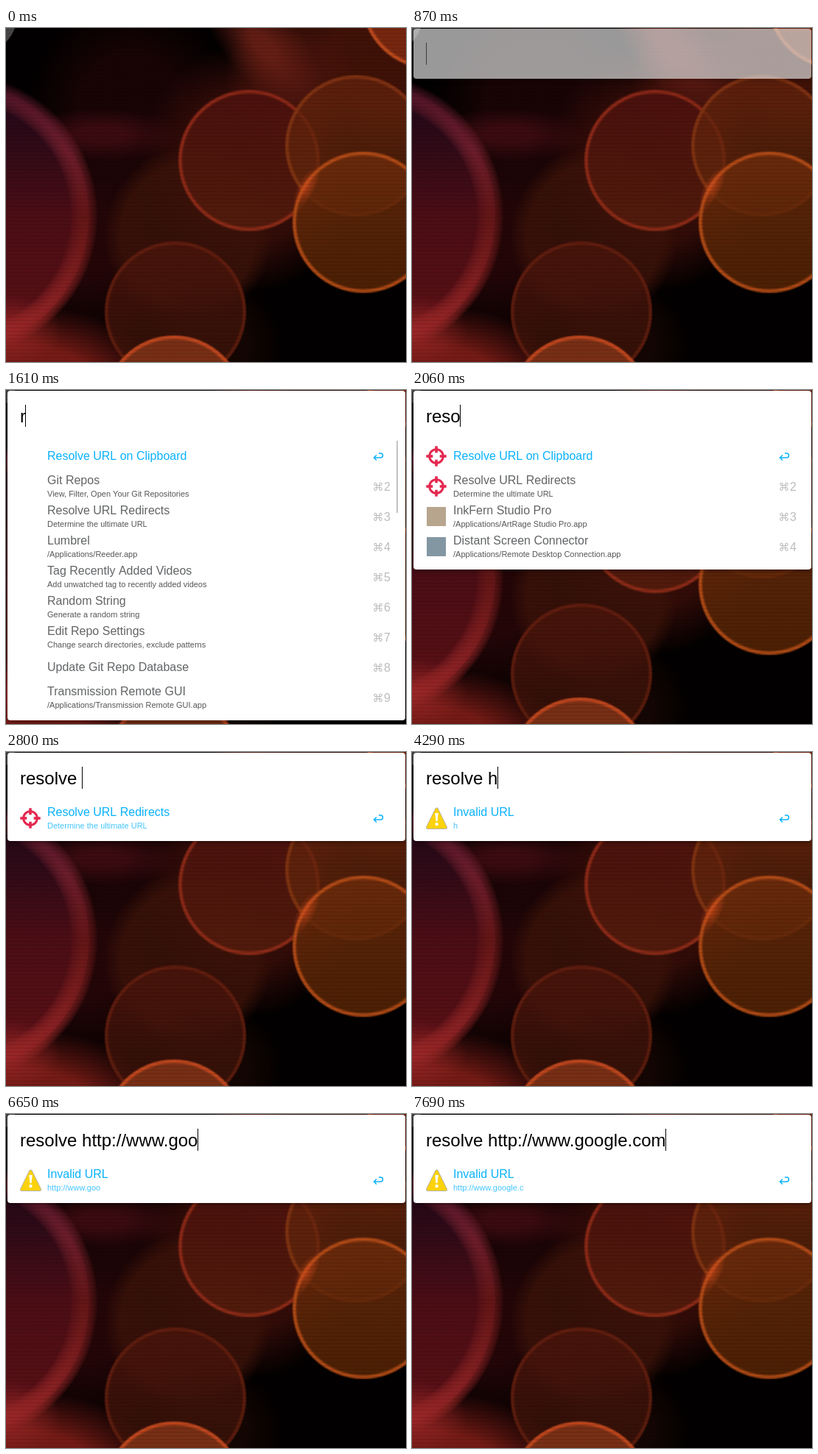
These frames come from a looping animation (543 by 454 pixels, 8 s). An HTML page with a canvas:

```html
<!DOCTYPE html>
<html lang="en">
<head>
<meta charset="utf-8">
<title>Launcher search</title>
<style>
  html, body { margin: 0; width: 100%; height: 100%; overflow: hidden; background: #000; }
  canvas { display: block; }
</style>
</head>
<body>
<canvas id="stage" width="543" height="454"></canvas>
<script>
const W = 543, H = 454, LOOP = 8000;
const SANS = '"Liberation Sans", Arial, sans-serif';
const BLUE = '#0ab2fb', PALE_BLUE = '#45c4fc', GREY = '#626466', RED = '#e4284f';
const ctx = document.getElementById('stage').getContext('2d');

// ---------- wallpaper ----------

function blob(g, x, y, rx, ry, rgb, alpha, core = 0.3, turn = 0) {
  g.save();
  g.translate(x, y);
  g.rotate(turn);
  g.scale(rx, ry);
  const fill = g.createRadialGradient(0, 0, 0, 0, 0, 1);
  fill.addColorStop(0, `rgba(${rgb},${alpha})`);
  fill.addColorStop(core, `rgba(${rgb},${alpha})`);
  fill.addColorStop(1, `rgba(${rgb},0)`);
  g.fillStyle = fill;
  g.fillRect(-1, -1, 2, 2);
  g.restore();
}

function ring(g, x, y, r, width, style) {
  g.beginPath();
  g.arc(x, y, r, 0, Math.PI * 2);
  g.lineWidth = width;
  g.strokeStyle = style;
  g.stroke();
}

function bokeh(g, x, y, r, top, bottom, edge, strength) {
  const fill = g.createLinearGradient(0, y - r, 0, y + r);
  fill.addColorStop(0, top);
  fill.addColorStop(1, bottom);
  g.fillStyle = fill;
  g.beginPath();
  g.arc(x, y, r, 0, Math.PI * 2);
  g.fill();
  [[8, 0.15], [5.5, 0.35], [3, 0.65]].forEach(([w, a]) =>
    ring(g, x, y, r - 2.5, w, `rgba(${edge},${a * strength})`));
}

function bigDisc(g) {
  const x = -69, y = 255, r = 194;
  const fill = g.createLinearGradient(0, 75, 0, 430);
  fill.addColorStop(0, '#1e0716');
  fill.addColorStop(0.25, '#300a17');
  fill.addColorStop(0.5, '#4b0d15');
  fill.addColorStop(1, '#5a1015');
  g.fillStyle = fill;
  g.beginPath();
  g.arc(x, y, r - 12, 0, Math.PI * 2);
  g.fill();

  const rim = g.createLinearGradient(0, 75, 0, 435);
  rim.addColorStop(0, 'rgba(88,22,44,.16)');
  rim.addColorStop(0.25, 'rgba(122,34,48,.16)');
  rim.addColorStop(0.5, 'rgba(106,24,24,.16)');
  rim.addColorStop(1, 'rgba(165,42,44,.2)');
  for (let w = 4; w <= 36; w += 4) ring(g, x, y, r - 19, w, rim);
}

function makeWallpaper() {
  const c = document.createElement('canvas');
  c.width = W;
  c.height = H;
  const g = c.getContext('2d');
  g.fillStyle = '#020000';
  g.fillRect(0, 0, W, H);

  blob(g, 170, 110, 140, 150, '26,4,5', 0.9, 0.5);
  blob(g, 520, 40, 180, 150, '66,18,7', 0.95, 0.45);
  blob(g, 330, 190, 150, 170, '52,12,8', 0.95, 0.6);
  blob(g, 130, 145, 110, 36, '64,12,17', 0.85, 0.3);
  blob(g, 110, 290, 150, 150, '44,7,9', 0.8, 0.3);
  blob(g, 385, 70, 88, 110, '74,20,12', 0.7, 0.5);
  blob(g, 350, 25, 115, 50, '104,31,22', 0.9, 0.2, 0.85);
  blob(g, 247, 282, 114, 120, '58,18,9', 0.85, 0.8);
  blob(g, 280, 430, 95, 90, '26,8,4', 0.7, 0.5);

  bigDisc(g);
  blob(g, 20, 485, 200, 108, '122,28,22', 0.95, 0.5);
  blob(g, 0, 412, 75, 50, '160,40,42', 0.7, 0.1);

  bokeh(g, 230, 386, 96, 'rgba(74,20,11,.85)', 'rgba(62,20,9,.7)', '108,36,18', 0.7);
  bokeh(g, 330, 180, 96, 'rgba(76,16,13,.92)', 'rgba(84,28,12,.88)', '158,48,28', 0.85);
  bokeh(g, 475, 160, 96, 'rgba(98,34,13,.78)', 'rgba(96,40,9,.72)', '140,58,22', 0.75);
  bokeh(g, 485, 264, 96, 'rgba(112,44,12,.8)', 'rgba(78,33,4,.95)', '192,82,26', 0.95);
  bokeh(g, 228, 513, 95, 'rgba(122,48,22,.95)', 'rgba(122,48,20,.95)', '205,76,32', 0.95);
  bokeh(g, 578, -40, 96, 'rgba(118,36,14,.95)', 'rgba(122,40,16,.95)', '205,84,34', 0.9);
  blob(g, 408, 216, 30, 12, '225,78,30', 0.5, 0.1, -1.05);

  g.fillStyle = '#464646';
  g.beginPath();
  g.arc(-32, -14, 46, 0, Math.PI * 2);
  g.fill();

  g.fillStyle = 'rgba(0,0,0,.13)';
  for (let y = 2; y < H; y += 5) g.fillRect(0, y, W, 1);
  return c;
}

const wallpaper = makeWallpaper();

// ---------- icons, centred on a row ----------

const icons = {
  target(y) {
    const x = 33;
    ring(ctx, x, y, 9.3, 3, RED);
    ctx.fillStyle = RED;
    for (let i = 0; i < 4; i++) {
      ctx.save();
      ctx.translate(x, y);
      ctx.rotate(i * Math.PI / 2);
      ctx.fillRect(-1.8, -13.7, 3.6, 9);
      ctx.restore();
    }
  },
  warning(y) {
    ctx.save();
    ctx.lineJoin = 'round';
    ctx.beginPath();
    ctx.moveTo(33.5, y - 12);
    ctx.lineTo(45.5, y + 12.5);
    ctx.lineTo(21.5, y + 12.5);
    ctx.closePath();
    ctx.lineWidth = 5;
    ctx.strokeStyle = '#b9b4a0';
    ctx.stroke();
    ctx.lineWidth = 3;
    ctx.strokeStyle = ctx.fillStyle = '#fbd20c';
    ctx.stroke();
    ctx.fill();
    ctx.fillStyle = '#fff';
    ctx.beginPath();
    ctx.moveTo(31.3, y - 7);
    ctx.lineTo(35.7, y - 7);
    ctx.lineTo(34.6, y + 4);
    ctx.lineTo(32.4, y + 4);
    ctx.fill();
    ctx.beginPath();
    ctx.arc(33.5, y + 8, 2.2, 0, Math.PI * 2);
    ctx.fill();
    ctx.restore();
  },
  sand(y) { square(y, '#b8a58e'); },
  slate(y) { square(y, '#8397a3'); }
};

function square(y, colour) {
  ctx.fillStyle = colour;
  ctx.fillRect(20, y - 13, 26, 26);
}

function returnKey(y) {
  ctx.strokeStyle = BLUE;
  ctx.lineWidth = 1.5;
  ctx.beginPath();
  ctx.moveTo(506, y - 4);
  ctx.lineTo(508.5, y - 4);
  ctx.arc(508.5, y - 1, 3, -Math.PI / 2, Math.PI / 2);
  ctx.lineTo(499.5, y + 2);
  ctx.moveTo(503, y - 1.5);
  ctx.lineTo(499.5, y + 2);
  ctx.lineTo(503, y + 5.5);
  ctx.stroke();
}

// ---------- result lists: title, subtitle, icon ----------

const clip = ['Resolve URL on Clipboard', '', 'target'];
const redirects = ['Resolve URL Redirects', 'Determine the ultimate URL', 'target'];
const broad = [
  clip,
  ['Git Repos', 'View, Filter, Open Your Git Repositories'],
  redirects,
  ['Lumbrel', '/Applications/Reeder.app'],
  ['Tag Recently Added Videos', 'Add unwatched tag to recently added videos'],
  ['Random String', 'Generate a random string'],
  ['Edit Repo Settings', 'Change search directories, exclude patterns'],
  ['Update Git Repo Database', ''],
  ['Transmission Remote GUI', '/Applications/Transmission Remote GUI.app']
];
const bare = broad.map(([title, sub]) => [title, sub]);
const narrow = [
  clip,
  redirects,
  ['InkFern Studio Pro', '/Applications/ArtRage Studio Pro.app', 'sand'],
  ['Distant Screen Connector', '/Applications/Remote Desktop Connection.app', 'slate']
];
const pair = [clip, redirects];
const single = [redirects];
const invalid = url => [['Invalid URL', url, 'warning']];

// ---------- timeline: time, query, rows, caret hidden ----------

const steps = [
  [870, '', []],
  [1470, '', [], true],
  [1610, 'r', bare],
  [1760, 're', broad],
  [2060, 'reso', narrow],
  [2510, 'resol', pair],
  [2650, 'resolv', pair],
  [2800, 'resolve ', single],
  [3400, 'resolve ', single, true],
  [4000, 'resolve ', single],
  [4150, 'resolve h', single]
];

const ADDRESS = 'http://www.google.com';
// time, characters typed, characters echoed in the subtitle
[
  [4290, 1], [4440, 2], [4590, 3], [4730, 4, 3], [4880, 4], [5020, 5],
  [5170, 6], [5320, 7], [5620, 8], [5770, 9], [5910, 10], [6060, 11, 10],
  [6210, 11], [6350, 12], [6500, 13], [6650, 14], [6800, 15], [6950, 16],
  [7100, 17], [7250, 18], [7540, 20, 19], [7690, 21, 19]
].forEach(([t, typed, echoed = typed]) =>
  steps.push([t, 'resolve ' + ADDRESS.slice(0, typed), invalid(ADDRESS.slice(0, echoed))]));

// ---------- drawing ----------

function text(str, x, y, size, colour, family = SANS) {
  ctx.font = `${size}px ${family}`;
  ctx.fillStyle = colour;
  ctx.fillText(str, x, y);
}

function drawRow([title, sub, icon], i) {
  const y = 90 + 41 * i, picked = i === 0;
  if (icon) icons[icon](y);
  text(title, 56, sub ? y - 3 : y + 5, 16, picked ? BLUE : GREY);
  if (sub) text(sub, 56, y + 14, 11, picked ? PALE_BLUE : '#565656');
  if (picked) {
    returnKey(y);
  } else {
    text('⌘', 497.5, y + 6, 15, '#bcbcbc', '"DejaVu Sans", sans-serif');
    text(String(i + 1), 513, y + 6, 16, '#bcbcbc');
  }
}

function drawPanel(query, rows, caretHidden) {
  const height = rows.length ? 79 + 41 * rows.length : 68;
  ctx.save();
  ctx.shadowColor = 'rgba(0,0,0,.5)';
  ctx.shadowBlur = 6;
  ctx.shadowOffsetY = 1;
  ctx.fillStyle = '#fff';
  ctx.beginPath();
  ctx.roundRect(2, 1, 540, height, 4);
  ctx.fill();
  ctx.restore();

  text(query, 19, 44, 24, '#000');
  if (!caretHidden) ctx.fillRect(Math.floor(19 + ctx.measureText(query).width), 20, 1, 30);
  rows.forEach(drawRow);
  if (rows.length > 8) {
    ctx.fillStyle = '#c3c3c3';
    ctx.fillRect(530, 69, 2, 98);
  }
}

function draw(t) {
  ctx.drawImage(wallpaper, 0, 0);
  const step = steps.filter(s => s[0] <= t).pop();
  if (!step) return;
  ctx.globalAlpha = t < 1020 ? 0.6 : 1;
  drawPanel(...step.slice(1));
  ctx.globalAlpha = 1;
}

const start = performance.now();
function tick() {
  draw((performance.now() - start) % LOOP);
  requestAnimationFrame(tick);
}
tick();
</script>
</body>
</html>
```
